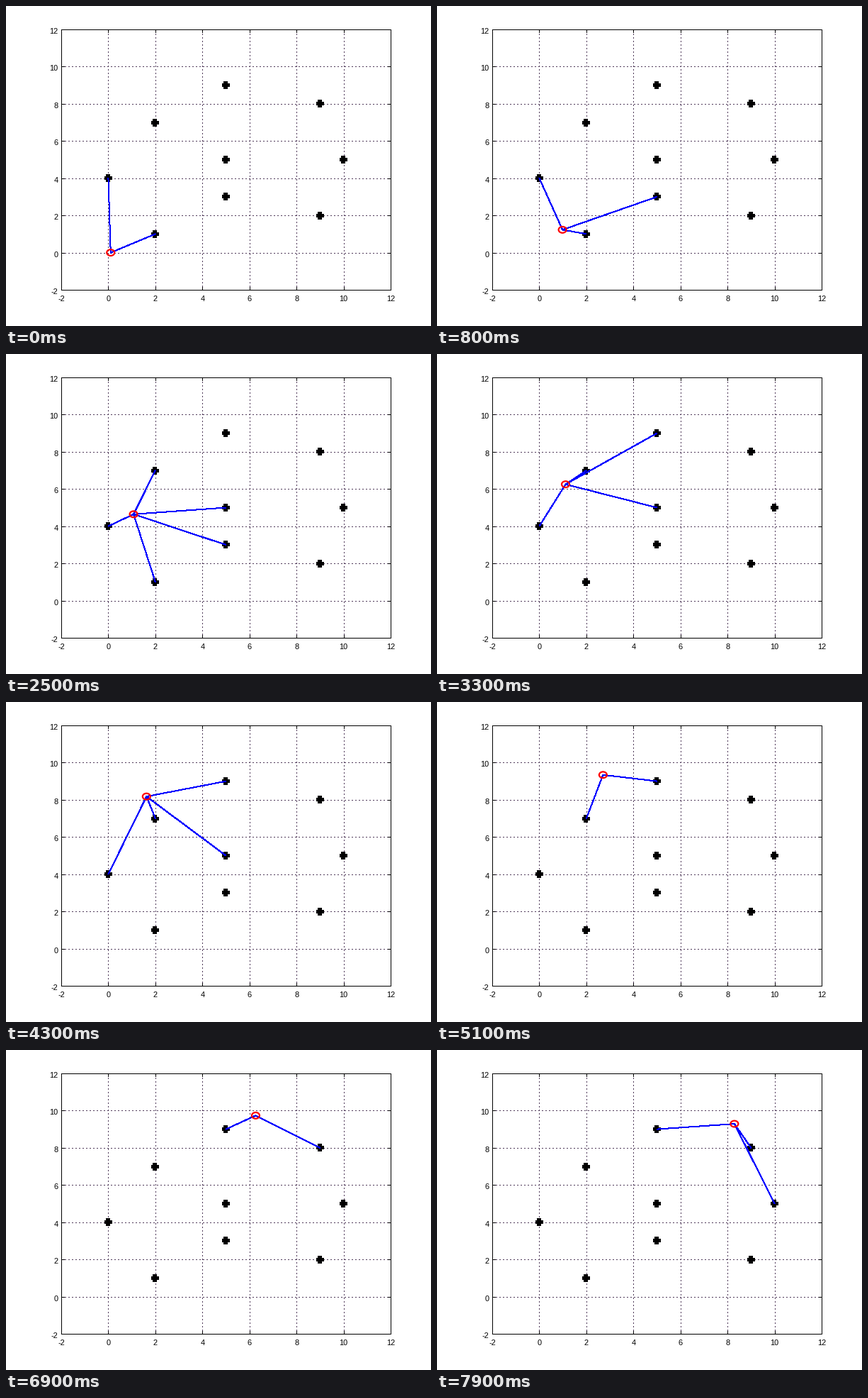
Recreate the animation shown at these times as a matplotlib script. Size 600 by 451 pixels, loop 8 s.

```python
import numpy as np
import matplotlib.pyplot as plt
from matplotlib.animation import FuncAnimation
from matplotlib.collections import LineCollection
from matplotlib.patches import Ellipse, Rectangle

W, H, DPI = 600, 451, 64
FRAMES, STEP = 80, 100
LEFT, RIGHT, TOP, BOTTOM = 78, 543, 33, 400
RANGE = 4.88  # how far the robot can see a landmark

LANDMARKS = np.array([(0, 4), (2, 1), (2, 7), (5, 3), (5, 5),
                      (5, 9), (9, 2), (9, 8), (10, 5)], float)


def pt(px):
    return px * 72 / DPI


def to_px(x, y):
    return (LEFT + (x + 2) * (RIGHT - LEFT) / 14,
            BOTTOM - (y + 2) * (BOTTOM - TOP) / 14)


def drive(sub=20):
    """Integrate speed and steered heading into one position per frame."""
    dt = STEP / 1000 / sub
    t = (np.arange(FRAMES * sub) + 0.5) * dt
    turn = np.radians(np.interp(t, [0, 0.8, 3.3, 4.3, 6, 7, 7.9],
                                [20, 88.5, 88.5, 62, -2, -2, -25]))
    speed = np.interp(t, [6, 8], [2.01, 2.13])
    moves = (speed * dt)[:, None] * np.column_stack([np.cos(turn), np.sin(turn)])
    path = np.vstack([np.zeros(2), np.cumsum(moves, axis=0)])
    return path[:-1:sub] + (0.1, 0)


path = drive()

fig = plt.figure(figsize=(W / DPI, H / DPI), dpi=DPI, facecolor="white")
ax = fig.add_axes([0, 0, 1, 1])
ax.set_xlim(0, W)
ax.set_ylim(H, 0)
ax.axis("off")


def line(x0, y0, x1, y1, **style):
    ax.plot([x0, x1], [y0, y1], lw=pt(1), antialiased=False,
            solid_capstyle="butt", dash_capstyle="butt", **style)


def label(x, y, text, ha):
    ax.text(x, y, text, ha=ha, va="center_baseline", color="black",
            family="Liberation Sans", fontsize=pt(11))


# The half-pixel offset keeps each dot on a single pixel
dotted = dict(color="#503a5a", linestyle=(0.5, (1, 3)), zorder=1)
solid = dict(color="black", zorder=2)

for v in range(-2, 13, 2):
    gx, gy = to_px(v, v)
    if -2 < v < 12:
        line(gx, BOTTOM, gx, TOP, **dotted)
        line(LEFT, gy, RIGHT, gy, **dotted)
    line(gx, BOTTOM, gx, BOTTOM - 4, **solid)
    line(gx, TOP, gx, TOP + 4, **solid)
    line(LEFT, gy, LEFT + 4, gy, **solid)
    line(RIGHT, gy, RIGHT - 4, gy, **solid)
    label(gx, 412, str(v), "center")
    label(73.5, gy + 2, str(v), "right")

for y in (TOP, BOTTOM):
    line(LEFT, y, RIGHT, y, **solid)
for x in (LEFT, RIGHT):
    line(x, TOP, x, BOTTOM, **solid)

for mark in LANDMARKS:
    cx, cy = np.floor(to_px(*mark))
    for w, h in ((11, 5), (6, 11)):
        ax.add_patch(Rectangle((cx - w // 2, cy - h // 2), w, h,
                               color="black", lw=0, zorder=3))

rays = LineCollection([], colors="#0000ff", linewidths=pt(1),
                      antialiaseds=False, zorder=4)
ax.add_collection(rays, autolim=False)
body = Ellipse((0, 0), 11, 8.8, fill=False, ec="#ff0000", lw=pt(2.2), zorder=5)
ax.add_patch(body)


def draw(k):
    pos = path[k]
    seen = LANDMARKS[np.hypot(*(LANDMARKS - pos).T) < RANGE]
    here = to_px(*pos)
    rays.set_segments([[here, to_px(*m)] for m in seen])
    body.set_center(here)
    return rays, body


anim = FuncAnimation(fig, draw, frames=FRAMES, interval=STEP,
                     repeat=True, repeat_delay=0, blit=False)
plt.show()
```
